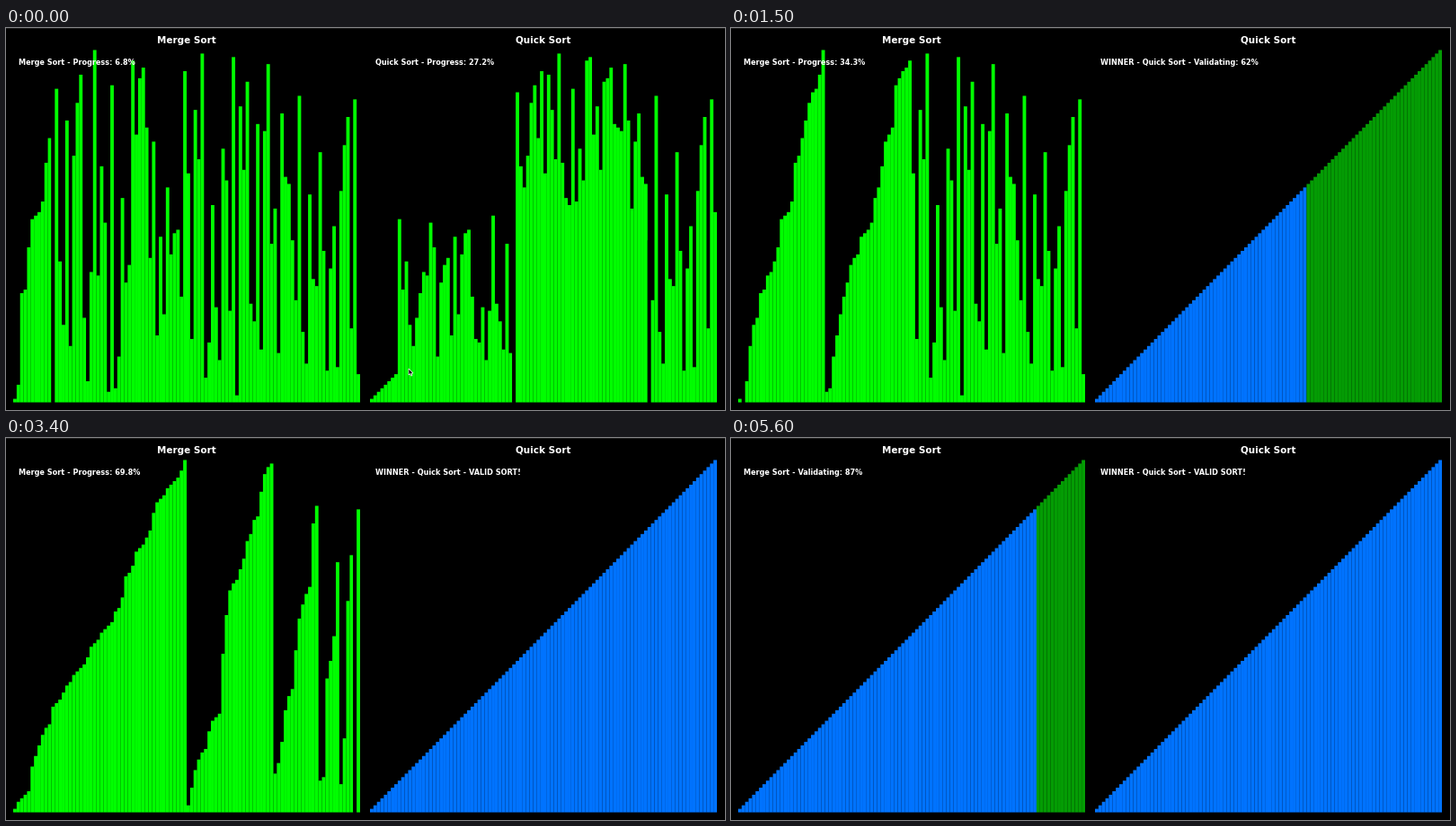
Animation, 800 px wide and 425 px high, one loop 5700 ms. Source, as a matplotlib script:

```python
import numpy as np
import matplotlib.pyplot as plt
from matplotlib.animation import FuncAnimation
from matplotlib.patches import Polygon, Rectangle

W, H, FRAMES, INTERVAL = 800, 425, 57, 100
N, BAR_W, UNIT, BASE = 100, 3.86, 3.92, 416.5
GREEN, DARK, BLUE, BLACK = "#00ff00", "#049c04", "#0073ff", "#000000"

DATA = [
    1, 5, 31, 44, 75, 68, 53, 54, 52, 32, 89, 57, 88, 40, 22, 80, 16, 70, 85, 93,
    24, 6, 37, 100, 36, 67, 51, 3, 90, 4, 13, 58, 34, 39, 97, 76, 92, 95, 78, 41,
    74, 19, 47, 25, 61, 42, 48, 49, 30, 94, 65, 18, 83, 69, 99, 7, 17, 56, 27, 12,
    72, 63, 26, 98, 2, 84, 66, 91, 28, 23, 79, 15, 77, 96, 45, 55, 14, 82, 64, 62,
    46, 29, 87, 20, 11, 59, 35, 33, 71, 43, 9, 38, 50, 10, 60, 73, 81, 21, 86, 8,
]


def merge_sort(a, lo, hi):
    """Yield the active indices after every compare and write."""
    if lo >= hi:
        return
    mid = (lo + hi) // 2
    yield from merge_sort(a, lo, mid)
    yield from merge_sort(a, mid + 1, hi)
    left, right = a[lo:mid + 1], a[mid + 1:hi + 1]
    i = j = 0
    for k in range(lo, hi + 1):
        if i < len(left) and j < len(right):
            yield lo + i, mid + 1 + j
            take_left = left[i] <= right[j]
        else:
            take_left = i < len(left)
        if take_left:
            a[k] = left[i]
            i += 1
        else:
            a[k] = right[j]
            j += 1
        yield (k,)


def quick_sort(a, lo, hi):
    """Lomuto partition; yield the active indices after every compare and swap."""
    if lo >= hi:
        return
    pivot, i = a[hi], lo
    for j in range(lo, hi):
        yield i, j
        if a[j] < pivot:
            a[i], a[j] = a[j], a[i]
            yield i, j
            i += 1
    a[i], a[hi] = a[hi], a[i]
    yield i, hi
    yield from quick_sort(a, lo, i - 1)
    yield from quick_sort(a, i + 1, hi)


def record(sort):
    a = DATA.copy()
    return [(a.copy(), active) for active in sort(a, 0, N - 1)]


merge_steps = record(merge_sort)
quick_steps = record(quick_sort)
quick_start = next(k for k, (_, act) in enumerate(quick_steps) if act == (41, 80))


class Panel:
    """One sorting race lane: frame -> step, progress, then validation."""

    def __init__(self, name, x, steps, keys, marks, percents, check_at, prefix=""):
        self.name, self.steps, self.prefix = name, steps, prefix
        self.keys, self.marks, self.percents = keys, marks, percents
        self.check_at = check_at
        self.bars = [
            ax.add_patch(Rectangle((x + k * BAR_W, BASE), BAR_W, 0, lw=0, snap=False))
            for k in range(N)
        ]
        bold = dict(color="white", family="DejaVu Sans", weight="bold")
        ax.text(x + N * BAR_W / 2, 16.6, name, size=7.45, ha="center", **bold)
        self.label = ax.text(x + 6, 40.6, "", size=5.85, **bold)

    def show(self, values, colors, text):
        for bar, v, c in zip(self.bars, values, colors):
            bar.set(height=-v * UNIT, facecolor=c)
        self.label.set_text(text)

    def update(self, f):
        done = list(range(1, N + 1))
        if f <= self.keys[-1]:
            values, active = self.steps[int(round(np.interp(f, self.keys, self.marks)))]
            colors = [BLACK if k in active else GREEN for k in range(N)]
            pct = np.interp(f, self.keys, self.percents)
            self.show(values, colors, f"{self.name} - Progress: {pct:.1f}%")
        elif f < self.check_at:
            self.show(done, [GREEN] * N, f"{self.name} - Progress: 100.0%")
        else:
            n = min(N, int((f - self.check_at) * 32))
            state = "VALID SORT!" if n == N else f"Validating: {n + 1}%"
            self.show(done, [BLUE] * n + [DARK] * (N - n),
                      f"{self.prefix}{self.name} - {state}")


fig = plt.figure(figsize=(W / 100, H / 100), dpi=100, facecolor="black")
ax = fig.add_axes([0, 0, 1, 1])
ax.set(xlim=(0, W), ylim=(H, 0))
ax.axis("off")
ax.add_patch(Rectangle((0, 0), W, 1, color="#1c1c1c", lw=0))

panels = [
    Panel("Merge Sort", 8, merge_steps,
          [0, 10, 15, 28, 40, 50],
          [76, 298, 410, 705, 976, 1205],
          [6.8, 25.0, 34.3, 58.6, 81.0, 99.9], 53.3),
    Panel("Quick Sort", 405, quick_steps,
          [0, 9.8], [quick_start, len(quick_steps) - 1], [27.2, 100], 13.08,
          "WINNER - "),
]

arrow = np.array([(0, 0), (0, 7), (1.7, 5.6), (2.9, 8.1), (4, 7.6), (2.9, 5.2), (5, 5)])
cursor = ax.add_patch(Polygon(arrow + (448, 379), fc="black", ec="white", lw=0.5, zorder=5))


def draw(f):
    for p in panels:
        p.update(f)
    cursor.set_visible(f < 2)
    return []


anim = FuncAnimation(fig, draw, frames=FRAMES, interval=INTERVAL, repeat=True,
                     repeat_delay=0, blit=False)
plt.show()
```
